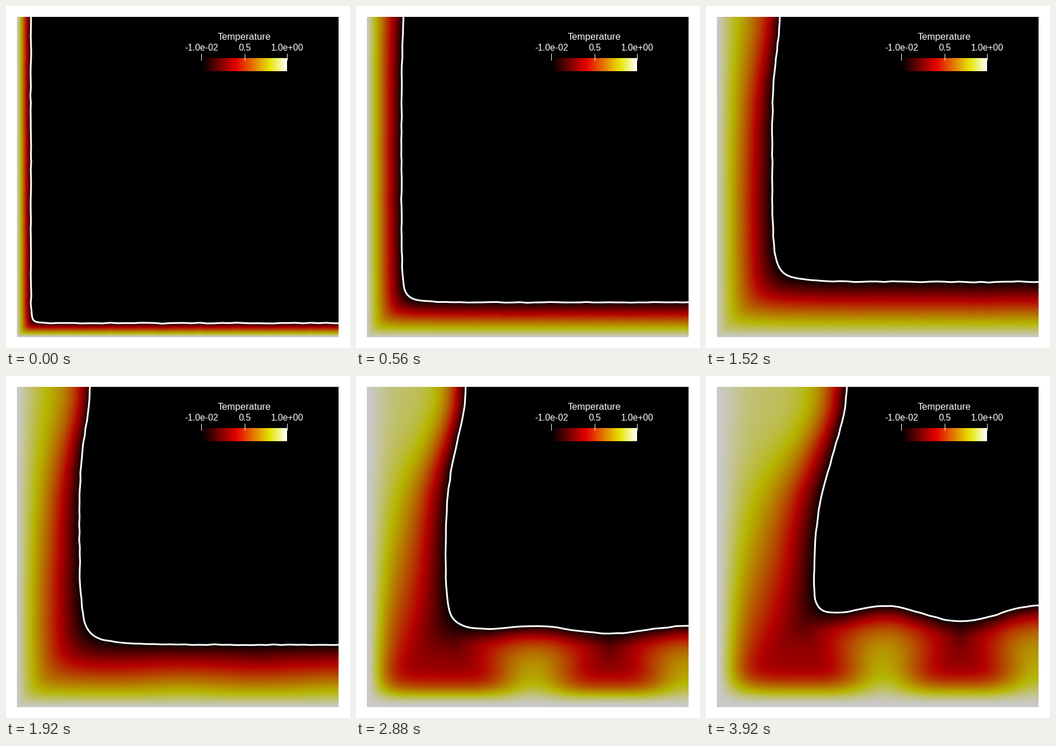
Animation, 601 px wide and 598 px high, one loop 4000 ms. Source, as a matplotlib script:

```python
import numpy as np
import matplotlib.pyplot as plt
from matplotlib.animation import FuncAnimation
from matplotlib.colors import LinearSegmentedColormap

W, H, DPI = 601, 598, 100
FRAMES, INTERVAL = 50, 80
LEFT, TOP, RIGHT, BOTTOM = 19, 19, 581, 579
PX = 72 / DPI
PLUME_X, PLUME_HALF = 310, 135

xs = np.linspace(LEFT, RIGHT, 282)
ys = np.linspace(TOP, BOTTOM, 281)
from_wall = np.maximum(xs - LEFT, 0.05)[None, :]
from_floor = np.maximum(BOTTOM - ys, 0.05)[:, None]
drop = np.clip((ys - TOP) / 492, 0, 1)[:, None]

# 1 above each rising plume, 0 between them
phase = np.maximum((xs - PLUME_X) / PLUME_HALF, -1)
wave = (0.5 + 0.5 * np.cos(np.pi * phase))[None, :]


def smoothstep(x):
    x = np.clip(x, 0, 1)
    return x * x * (3 - 2 * x)


def soft_min(a, b, p):
    lo, hi = np.minimum(a, b), np.maximum(a, b)
    return lo * (1 + (lo / hi) ** p) ** (-1 / p)


def layer(dist, size, power):
    return np.exp(-(dist / size) ** power)


def rough(rng, grid):
    """Small jaggedness of the melt front."""
    knots = np.arange(0, 620, 13)
    return np.interp(grid, knots, rng.normal(0, 0.4, len(knots)))


def melt_depths(frame, depth):
    """Distance of the front from the left wall and from the floor."""
    rng = np.random.default_rng(frame)
    part = frame / (FRAMES - 1)
    bulge = 0.35 * part * np.exp(-0.5 * ((ys - TOP) / (30 + 85 * part)) ** 2)
    wall = depth * (1 + bulge) + rough(rng, ys)

    ripple = smoothstep((frame - 27) / 16) * np.clip((xs - 150) / 160, 0, 1)
    floor = depth * (1 + ripple * (0.16 * wave[0] - 0.105)) + rough(rng, xs)
    return wall[:, None], floor[None, :]


def conduction(a, b, u, power):
    """Nearly linear profile, rounder near the heated corner."""
    v = np.minimum(soft_min(a, b, 1.1 + (power - 1.1) * u), 1)
    return 1 - v + 0.05 * np.sin(np.pi * v)


def convection(b, u, depth):
    """Stratified core with plumes and hot layers along the walls."""
    plume = wave ** np.maximum(2.5 - 2.6 * u, 0.4) / (1 + (b / 1.15) ** 16)
    core = 0.9 - 0.55 * drop**2
    core = core + (0.76 - core) * plume
    sharp = 2.6 + 3.5 * np.exp(-(drop / 0.25) ** 2) + 2.5 * plume
    inner = core * (1 - u**sharp)
    cool = ((1 - layer(from_wall, 0.25 * depth, 1.6))
            * (1 - layer(from_floor, 0.235 * depth, 2)))
    return 1 - (1 - inner) * cool


def field(frame):
    """Temperature, and a level that equals 1 on the melt front."""
    depth = np.sqrt(600 + 440 * frame + 0.0515 * frame**3)
    wall, floor = melt_depths(frame, depth)
    a, b = from_wall / wall, from_floor / floor
    power = 4 + 7 * smoothstep((frame - 29) / 18)
    level = soft_min(a, b, power)
    u = np.minimum(level, 1)

    # Convection sets in at the top first
    stir = smoothstep((frame - 4 - 16 * drop) / (34 - 14 * drop))
    still = conduction(a, b, u, power)
    temp = still + (convection(b, u, depth) - still) * stir
    return np.where(level < 1, temp, -0.01), level


def black_body(name, shade):
    stops = [(0, (0, 0, 0)), (0.4, (0.9, 0, 0)),
             (0.8, (0.9, 0.9, 0)), (1, (1, 1, 1))]
    return LinearSegmentedColormap.from_list(
        name, [(p, [shade * c for c in rgb]) for p, rgb in stops], N=512)


fig = plt.figure(figsize=(W / DPI, H / DPI), dpi=DPI, facecolor="white")
ax = fig.add_axes([0, 0, 1, 1])
ax.axis("off")

image = ax.imshow(field(0)[0], cmap=black_body("melt", 0.79),
                  vmin=-0.01, vmax=1, interpolation="bilinear",
                  extent=[LEFT, RIGHT, BOTTOM, TOP], aspect="auto", zorder=2)

# Colour bar
ax.imshow(np.linspace(0, 1, 256)[None, :], cmap=black_body("bar", 1),
          extent=[342, 491, 114, 91], aspect="auto", zorder=4)


def write(x, y, text, size):
    ax.text(x, y, text, color="white", size=size * PX, ha="center",
            va="baseline", family="Liberation Sans", zorder=5)


for x, label in ((341.5, "-1.0e-02"), (417.5, "0.5"), (491.5, "1.0e+00")):
    ax.plot([x - 0.5, x - 0.5], [83, 95], color="white", lw=PX, zorder=5,
            solid_capstyle="butt")
    write(x, 77.5, label, 15.6)
write(416, 59.5, "Temperature", 16.5)

ax.set_xlim(0, W)
ax.set_ylim(H, 0)
fronts = []


def update(frame):
    temp, level = field(frame)
    image.set_data(temp)
    while fronts:
        fronts.pop().remove()
    fronts.append(ax.contour(xs, ys, level, levels=[1], colors="white",
                             linewidths=3 * PX, zorder=3))
    return [image]


anim = FuncAnimation(fig, update, frames=FRAMES, interval=INTERVAL,
                     init_func=lambda: [image], repeat=True, repeat_delay=0,
                     blit=False)
plt.show()
```
